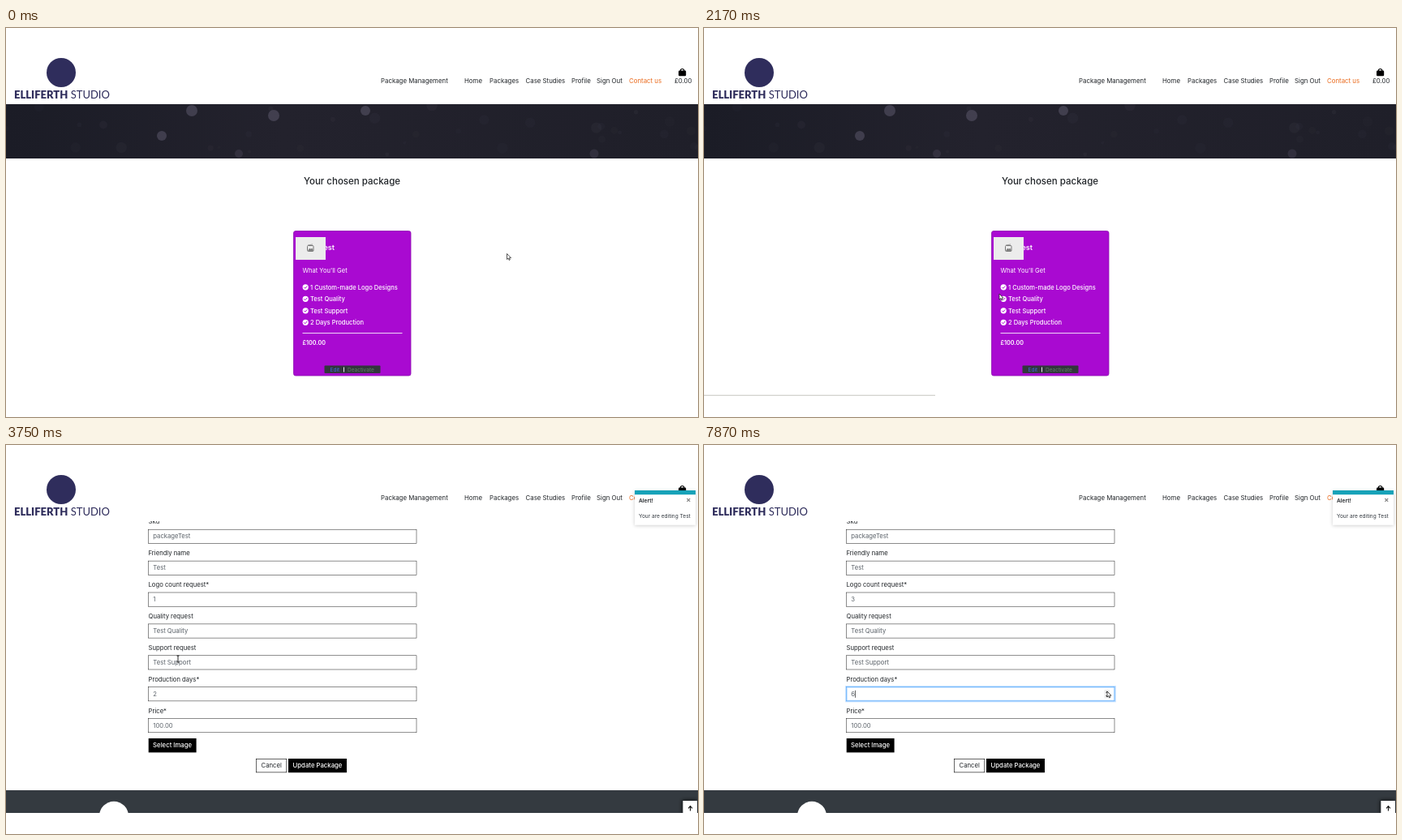
Animation, 853 px wide and 480 px high, one loop 8 s. Source, as an HTML page:

```html
<!DOCTYPE html>
<html lang="en">
<head>
<meta charset="utf-8">
<title>Package editor</title>
<style>
  html, body { margin: 0; width: 100%; height: 100%; overflow: hidden; background: #fff; }
  svg { display: block; width: 100vw; height: 100vh; }
  text { font: 400 7.7px Inter, "Open Sans", sans-serif; fill: #212529; white-space: pre; }
</style>
</head>
<body>
<svg id="stage" viewBox="0 0 853 480">
  <defs>
    <clipPath id="view"><rect width="853" height="454"/></clipPath>
    <clipPath id="below"><rect y="94" width="853" height="360"/></clipPath>
    <clipPath id="band"><rect y="94" width="853" height="67"/></clipPath>
    <linearGradient id="night">
      <stop offset="0" stop-color="#1b1c26"/>
      <stop offset=".4" stop-color="#23222d"/>
      <stop offset="1" stop-color="#1f1f29"/>
    </linearGradient>
    <filter id="soft" x="-50%" y="-50%" width="200%" height="200%">
      <feDropShadow dx="0" dy="1" stdDeviation="2" flood-opacity=".2"/>
    </filter>
    <filter id="deep" x="-80%" y="-80%" width="260%" height="260%">
      <feDropShadow dx="-1" dy="-1" stdDeviation="2.5" flood-opacity=".7"/>
    </filter>
  </defs>
</svg>
<script>
const LOOP = 8000, SCROLL = 181.2, PITCH = 38.9;
const stage = document.getElementById('stage');

function add(parent, tag, attrs) {
  const node = document.createElementNS('http://www.w3.org/2000/svg', tag);
  for (const key in attrs) node.setAttribute(key, attrs[key]);
  parent.appendChild(node);
  return node;
}
const group = (parent, attrs = {}) => add(parent, 'g', attrs);
const rect = (parent, x, y, width, height, fill, more = {}) =>
  add(parent, 'rect', { x, y, width, height, fill, ...more });
const path = (parent, d, fill, more = {}) => add(parent, 'path', { d, fill, ...more });
const circle = (parent, cx, cy, r, fill, more = {}) =>
  add(parent, 'circle', { cx, cy, r, fill, ...more });
function label(parent, x, y, words, style = '') {
  const node = add(parent, 'text', { x, y, style });
  node.textContent = words;
  return node;
}
const show = (node, on) => node.setAttribute('display', on ? 'inline' : 'none');
const move = (node, x, y) => node.setAttribute('transform', `translate(${x} ${y})`);

// Package page
const shop = group(stage, { 'clip-path': 'url(#view)' });
rect(shop, 0, 94, 853, 67, 'url(#night)');
const lights = group(shop, { 'clip-path': 'url(#band)' });
let seed = 11;
const random = () => (seed = (seed * 16807) % 2147483647) / 2147483647;
for (let i = 0; i < 34; i++) {
  circle(lights, random() * 853, 94 + random() * 67, 2 + random() * 5, '#8b819c',
    { opacity: 0.02 + random() * 0.04 });
}
[[229, 102, 7], [330, 108, 7], [443, 102, 6], [192, 133, 6], [725, 155, 5.5], [287, 155, 5]]
  .forEach(([x, y, r], i) => circle(lights, x, y, r, '#8c84a0', { opacity: i < 4 ? 0.3 : 0.16 }));

label(shop, 426.5, 193, 'Your chosen package', 'font-size:11.5px;font-weight:500;text-anchor:middle');
rect(shop, 354.5, 250.5, 144.5, 178.5, '#a90ad1', { rx: 2.5, stroke: '#8d10b0', 'stroke-width': 0.8 });
const white = 'fill:#fff;font-weight:500;';
label(shop, 405, 274, 'Test', white + 'font-size:9px;font-weight:600;text-anchor:end');
rect(shop, 357, 258, 37, 28, '#ececec');
rect(shop, 371.5, 268.5, 7.5, 7, 'none', { rx: 1, stroke: '#777', 'stroke-width': 1 });
path(shop, 'M372 268 L378 267 M372.5 274.5 L374.5 272 L376 273.5 L377 272 L378.5 274.5 Z', '#777',
  { stroke: '#777', 'stroke-width': 0.7 });
label(shop, 365.5, 302, "What You'll Get", white + 'font-weight:400;font-size:7.6px');
['1 Custom-made Logo Designs', 'Test Quality', 'Test Support', '2 Days Production'].forEach((words, i) => {
  const y = 319.8 + i * 14.5;
  circle(shop, 369.2, y, 3.6, '#fff');
  path(shop, `M367.3 ${y} l1.4 1.5 l2.5 -2.8`, 'none', { stroke: '#a90ad1', 'stroke-width': 1 });
  label(shop, 375, y + 2.8, words, white + 'font-size:7.55px');
});
path(shop, 'M365.5 376.5 H488.5', 'none', { stroke: '#f0d5f7', 'stroke-width': 1 });
label(shop, 365.5, 391, '£100.00', white + 'font-size:7.2px;font-weight:600');
rect(shop, 392.5, 416.5, 69, 9.5, '#32363c', { rx: 1 });
label(shop, 399.5, 423.5, 'Edit', 'font-size:6.5px;fill:#3f6be0');
rect(shop, 416, 418.5, 0.9, 6, '#fff');
label(shop, 421, 423.5, 'Deactivate', 'font-size:6.5px;fill:#5d8464');

// Edit page
const editor = group(stage, { 'clip-path': 'url(#below)' });
const form = group(editor);
label(form, 175.5, 166.3, 'Package Management', 'font-size:15.1px;font-weight:600');
label(form, 175.5, 199.8, 'Edit a Package');
rect(form, 513, 234, 6.3, 6.3, '#1673e6', { rx: 1 });
path(form, 'M514.4 237.2 l1.4 1.5 l2.3 -3', 'none', { stroke: '#fff', 'stroke-width': 0.9 });
label(form, 521.8, 239.8, 'Active');

const fields = [
  ['Name*', 'Test'], ['Sku', 'packageTest'], ['Friendly name', 'Test'], ['Logo count request*', '1'],
  ['Quality request', 'Test Quality'], ['Support request', 'Test Support'],
  ['Production days*', '2'], ['Price*', '100.00']
].map(([name, value], i) => {
  const y = 237 + i * PITCH;
  label(form, 175.5, y + 2.8, name);
  const box = rect(form, 175.6, y + 9.5, 330.4, 17.2, '#fff', { 'stroke-width': 0.45 });
  const glow = rect(form, 175.5, y + 9.2, 331, 17.6, 'none',
    { stroke: '#007bff', 'stroke-opacity': 0.25, 'stroke-width': 2.6 });
  const text = label(form, 181.3, y + 20.5, value, 'fill:#5b6269');
  const caret = rect(form, 186.2, y + 13.6, 0.7, 9, '#222');
  const spin = group(form);
  rect(spin, 493.5, y + 12.8, 6.5, 10.5, '#ededed');
  path(spin, `M495 ${y + 16.6} l1.8 -2.2 l1.8 2.2 z M495 ${y + 19.8} l1.8 2.2 l1.8 -2.2 z`, '#505050');
  return { box, glow, text, caret, spin };
});
const button = 'font-weight:500;font-size:7.75px;text-anchor:middle;';
rect(form, 175.7, 543.2, 58.9, 17.4, '#000');
label(form, 205.1, 554.7, 'Select Image', button + 'fill:#fff');
rect(form, 308.4, 568.5, 37.4, 16.6, '#fff', { stroke: '#000', 'stroke-width': 0.6 });
label(form, 327.2, 579.3, 'Cancel', button + 'font-weight:400');
rect(form, 348, 568.2, 72, 17.2, '#000');
label(form, 384, 579.3, 'Update Package', button + 'fill:#fff');
rect(form, 0, 607.2, 853, 60, '#343a40');
circle(form, 133, 639, 18, '#fff');

const toTop = group(editor);
rect(toTop, 834.5, 439, 17.5, 17, '#fff', { filter: 'url(#deep)' });
path(toTop, 'M843.5 451.5 V446 M841 448.3 L843.5 445.6 L846 448.3', 'none', { stroke: '#111', 'stroke-width': 1.1 });

// Fixed header
const header = group(stage);
circle(header, 68, 55, 18, '#2f2d5c');
const brand = label(header, 10, 86.5, '', 'font-family:Lato,sans-serif;font-size:13px;fill:#2f2d5c');
[['ELLIFERTH', 900], [' STUDIO', 400]].forEach(([words, weight]) => {
  add(brand, 'tspan', { 'font-weight': weight }).textContent = words;
});
[[462, 'Package Management'], [565, 'Home'], [596, 'Packages'], [640.5, 'Case Studies'], [697, 'Profile'],
  [728, 'Sign Out'], [768, 'Contact us'], [824, '£0.00']].forEach(([x, words]) =>
  label(header, x, 68, words, 'font-size:7.85px;' + (words === 'Contact us' ? 'fill:#ea6a1c' : '')));
rect(header, 829, 52.6, 9.2, 6.6, '#000', { rx: 1.2 });
path(header, 'M831.3 54 v-1.2 a2.3 2.3 0 0 1 4.6 0 v1.2', 'none', { stroke: '#000', 'stroke-width': 1.1 });

const toast = group(stage);
rect(toast, 775, 56, 75, 42.5, '#fff', { filter: 'url(#soft)' });
rect(toast, 775, 56, 75, 5.2, '#17a2b8');
label(toast, 780, 71.3, 'Alert!', 'font-size:6.6px;font-weight:600');
path(toast, 'M839.4 66 l3.8 3.8 m0 -3.8 l-3.8 3.8', 'none', { stroke: '#888', 'stroke-width': 1.2 });
label(toast, 780, 89.8, 'Your are editing Test', 'font-size:6.55px;fill:#343a40');

const status = rect(stage, 0, 452.7, 285, 1.2, '#cfcfca');

// Pointer shapes
const pens = {
  arrow: path(stage, 'M0 0 V7 L1.6 5.6 L2.7 8 L3.8 7.5 L2.8 5.2 H5 Z', '#fff', { stroke: '#111', 'stroke-width': 0.7 }),
  hand: path(stage, 'M-.6 0 Q0 -.8 .6 0 V3 L3.6 3.7 Q4.2 4 4 5 L3.4 8 H-.8 L-2.6 5 Q-2.2 4 -.6 5 Z', '#fff',
    { stroke: '#111', 'stroke-width': 0.7 }),
  beam: path(stage, 'M-1.5 -4 H1.5 M0 -4 V4 M-1.5 4 H1.5', 'none', { stroke: '#111', 'stroke-width': 0.9 })
};

// time, x, y, shape used until the next point
const route = [
  [0, 617.5, 278.5, 'arrow'], [200, 617.5, 278.5, 'arrow'], [900, 404, 372, 'arrow'],
  [1090, 404, 372, 'arrow'], [1400, 404, 419, 'hand'], [1850, 404, 419, 'arrow'],
  [2150, 364, 328, 'arrow'], [2250, 364, 328, 'arrow'], [2850, 198.5, 269.5, 'arrow'],
  [3300, 205, 267, 'arrow'], [3600, 212, 264, 'beam'], [4050, 212, 264, 'beam'],
  [4950, 497.5, 187, 'arrow'], [6200, 497.5, 187, 'arrow'], [6750, 497, 304, 'arrow'],
  [LOOP, 497, 304, 'arrow']
];
const ease = p => p * p * (3 - 2 * p);
const phase = (t, from, to) => ease(Math.min(1, Math.max(0, (t - from) / (to - from))));
const passed = (t, times) => times.filter(at => t >= at).length;

function draw(t) {
  const editing = t >= 2450;
  show(shop, !editing);
  show(editor, editing);
  show(toast, editing);
  show(status, t >= 1350 && t < 3250);
  move(form, 0, -SCROLL * phase(t, 3080, 3520));

  const i = route.findIndex((stop, n) => t < route[n + 1][0]);
  const [from, x0, y0, shape] = route[i], [to, x1, y1] = route[i + 1];
  const p = phase(t, from, to), x = x0 + (x1 - x0) * p, y = y0 + (y1 - y0) * p;
  for (const name in pens) {
    show(pens[name], name === shape);
    move(pens[name], x, y);
  }

  const focus = t >= 6900 ? 6 : t >= 5450 ? 3 : -1;
  const hover = t >= 6650 ? 6 : t >= 4850 && t < 6350 ? 3 : -1;
  fields[3].text.textContent = 1 + passed(t, [5450, 5850]);
  fields[6].text.textContent = 2 + passed(t, [6900, 7150, 7400, 7650]);
  fields.forEach((field, n) => {
    field.box.setAttribute('stroke', n === focus ? '#3d9bf5' : '#000');
    show(field.glow, n === focus);
    show(field.caret, n === focus);
    show(field.spin, n === hover);
  });
}

function tick(now) {
  draw(now % LOOP);
  requestAnimationFrame(tick);
}
draw(0);
requestAnimationFrame(tick);
</script>
</body>
</html>
```
